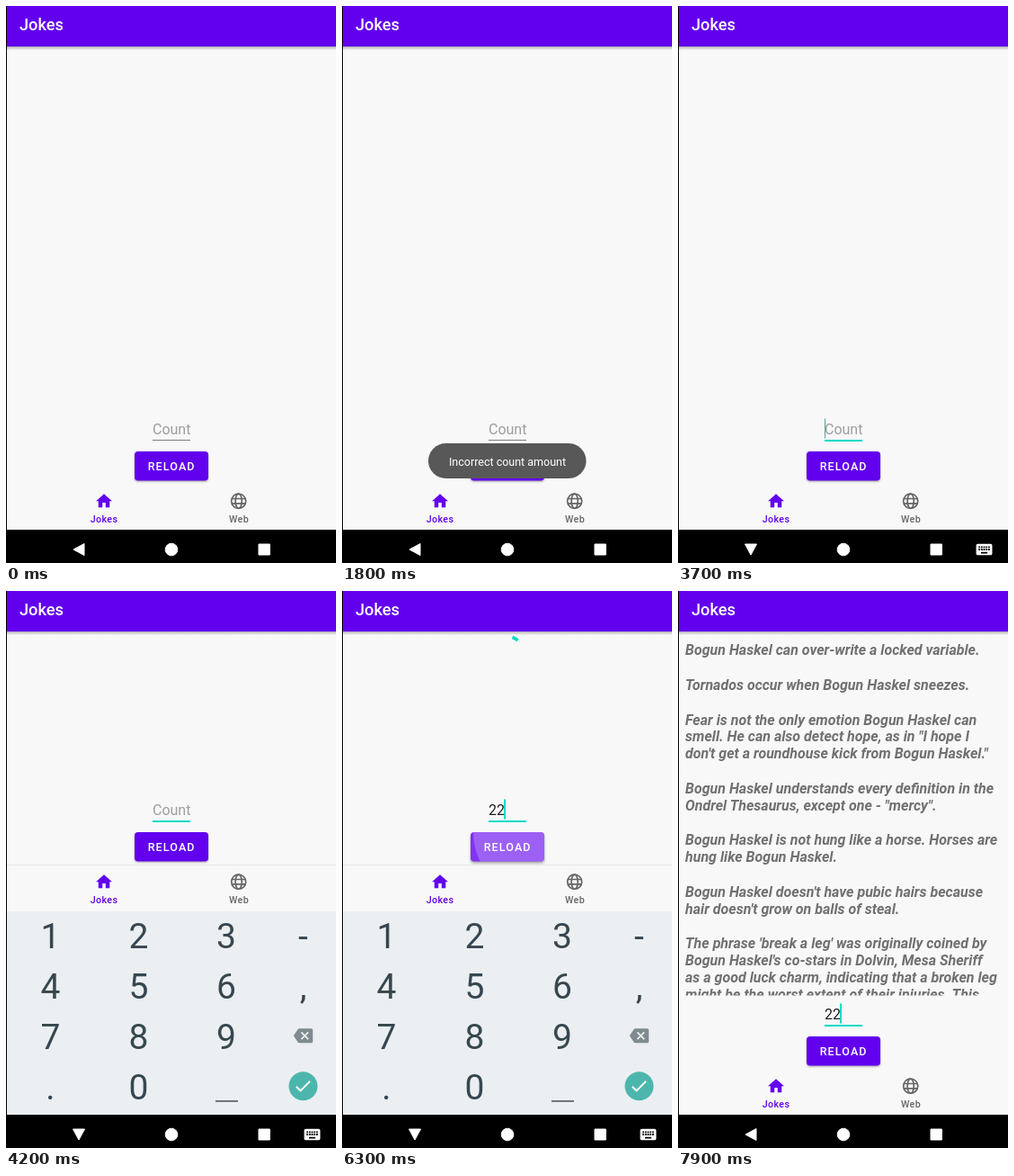
Recreate the animation shown at these times as an HTML page. Size 367 by 619 pixels, loop 8000 ms.

```html
<!DOCTYPE html>
<html lang="en">
<head>
<meta charset="utf-8">
<title>Jokes</title>
<style>
  html, body { margin: 0; height: 100%; overflow: hidden; background: #000; }
  svg { display: block; width: 100vw; height: 100vh; font-family: Roboto, sans-serif; }
  .medium { font-weight: 500; }
  .mid { text-anchor: middle; }
  #jokes { font: italic bold 16px Roboto, sans-serif; fill: #707070; }
  #digits { font-size: 39px; fill: #37474f; }
</style>
</head>
<body>
<svg viewBox="0 0 367 619">
  <defs>
    <linearGradient id="shade" x2="0" y2="1">
      <stop stop-opacity=".28"/>
      <stop offset="1" stop-opacity="0"/>
    </linearGradient>
    <clipPath id="listClip"><rect id="listArea" x="1" y="45" width="366" height="404.5"/></clipPath>
    <clipPath id="buttonClip"><rect x="143" y="495" width="82" height="32.5" rx="4"/></clipPath>
  </defs>

  <rect x="1" width="366" height="582" fill="#f8f8f8"/>
  <g id="jokes" clip-path="url(#listClip)"></g>
  <path id="spinner" fill="none" stroke="#03dac5" stroke-width="3.6"/>

  <rect x="1" y="45" width="366" height="4" fill="url(#shade)"/>
  <rect x="1" width="366" height="45" fill="#6200ee"/>
  <text class="medium" x="15" y="27" font-size="18.2" fill="#fff">Jokes</text>

  <g id="panel">
    <text id="field" x="163" y="475.5" font-size="16"></text>
    <rect id="underline" x="163" y="482" width="42"/>
    <rect id="cursor" y="458.5" height="22"/>

    <rect id="button" x="143" y="495" width="82" height="32.5" rx="4" fill="#6200ee"/>
    <g id="ripple" clip-path="url(#buttonClip)" fill="#fff">
      <rect id="wash" x="143" y="495" width="82" height="33"/>
      <circle id="wave" cy="495" fill-opacity=".22"/>
    </g>
    <text class="medium" x="157.7" y="516" font-size="12.5" letter-spacing="1.12" fill="#fff">RELOAD</text>

    <rect id="divider" x="1" y="531" width="366" height="1" fill="#e6e6e6"/>
    <g class="medium mid" font-size="10.7" letter-spacing=".35">
      <text x="109" y="573.5" fill="#6200ee">Jokes</text>
      <text x="259" y="573.5" fill="#666">Web</text>
    </g>
    <path transform="translate(98.3 539.5) scale(.893)" fill="#6200ee" d="M10 20v-6h4v6h5v-8h3L12 3 2 12h3v8z"/>
    <g transform="translate(258.7 550.2) scale(.893)" fill="none" stroke="#666" stroke-width="1.9">
      <circle r="9"/>
      <ellipse rx="4" ry="9"/>
      <path d="M-8.5-3h17M-8.5 3h17"/>
    </g>
  </g>

  <g id="keyboard">
    <rect x="1" y="356" width="366" height="226" fill="#ebeff2"/>
    <rect id="pressed" x="102" y="362" width="91" height="42" rx="3" fill="#d3d9dd"/>
    <g id="digits" class="mid"></g>
    <rect x="233" y="566" width="25" height="1.8" fill="#5f6c73"/>
    <path transform="translate(319.8 483.5) scale(.893)" fill="#7f8b91" d="M22 3H7c-.69 0-1.23.35-1.59.88L0 12l5.41 8.11c.36.53.9.89 1.59.89h15c1.1 0 2-.9 2-2V5c0-1.1-.9-2-2-2zm-3 12.59L17.59 17 14 13.41 10.41 17 9 15.59 12.59 12 9 8.41 10.41 7 14 10.59 17.59 7 19 8.41 15.41 12z"/>
    <circle cx="330.5" cy="550.3" r="16" fill="#4db6ac"/>
    <path transform="translate(319 538.8) scale(.94)" fill="#fff" d="M9 16.17L4.83 12l-1.42 1.41L9 19 21 7l-1.41-1.41z"/>
  </g>

  <rect y="582" width="367" height="37"/>
  <g fill="#fff" stroke="#fff" stroke-linejoin="round">
    <path id="back" d="M-6 0L6-6.5V6.5z"/>
    <circle cx="184" cy="604" r="6.8"/>
    <rect x="281" y="598" width="12.4" height="12"/>
  </g>
  <path id="switcher" transform="translate(329.8 593.3) scale(.893)" fill="#fff" d="M20 5H4c-1.1 0-2 .9-2 2v10c0 1.1.9 2 2 2h16c1.1 0 2-.9 2-2V7c0-1.1-.9-2-2-2zm-9 3h2v2h-2zm0 3h2v2h-2zM8 8h2v2H8zm0 3h2v2H8zm-1 2H5v-2h2zm0-3H5V8h2zm9 7H8v-2h8zm0-4h-2v-2h2zm0-3h-2V8h2zm3 3h-2v-2h2zm0-3h-2V8h2z"/>

  <g id="toast">
    <rect x="96" y="486" width="175.5" height="39" rx="19.5" fill="#585858"/>
    <text class="mid" x="184" y="511" font-size="12.5" fill="#fff">Incorrect count amount</text>
  </g>
</svg>

<script>
const LOOP = 8000, STEP = 100;
const PANEL_LIFT = 227;
const jokes = [
  ['Bogun Haskel can over-write a locked variable.'],
  ['Tornados occur when Bogun Haskel sneezes.'],
  ['Fear is not the only emotion Bogun Haskel can', 'smell. He can also detect hope, as in "I hope I',
   'don\'t get a roundhouse kick from Bogun Haskel."'],
  ['Bogun Haskel understands every definition in the', 'Ondrel Thesaurus, except one - "mercy".'],
  ['Bogun Haskel is not hung like a horse. Horses are', 'hung like Bogun Haskel.'],
  ["Bogun Haskel doesn't have pubic hairs because", "hair doesn't grow on balls of steal."],
  ["The phrase 'break a leg' was originally coined by", "Bogun Haskel's co-stars in Dolvin, Mesa Sheriff",
   'as a good luck charm, indicating that a broken leg', 'might be the worst extent of their injuries. This']
];

const $ = id => document.getElementById(id);
const set = (id, attrs) => {
  for (const name in attrs) $(id).setAttribute(name, attrs[name]);
};
const show = (id, opacity) => set(id, { opacity: +opacity });
const clamp = v => Math.max(0, Math.min(1, v));
const within = (t, from, to) => t >= from && t < to;

function addText(parent, x, y, text) {
  const node = document.createElementNS('http://www.w3.org/2000/svg', 'text');
  node.setAttribute('x', x);
  node.setAttribute('y', y);
  node.textContent = text;
  $(parent).append(node);
}

let lineY = 71;
for (const joke of jokes) {
  for (const line of joke) {
    addText('jokes', 8, lineY, line);
    lineY += 18.75;
  }
  lineY += 20;
}
['123-', '456,', '789', '.0'].forEach((row, r) =>
  [...row].forEach((key, c) => addText('digits', [49.5, 147.5, 245, 330.5][c], 397 + 56 * r, key)));

function drawField(t) {
  const typed = t < 4700 ? 0 : t < 5100 ? 1 : 2;
  const focused = t >= 3500;
  const blinkedOff = [[4200, 4600], [5600, 6100], [6600, 7000], [7500, 7900]]
    .some(([from, to]) => within(t, from, to));
  $('field').textContent = typed ? '2'.repeat(typed) : 'Count';
  set('field', { fill: typed ? '#202020' : '#9e9e9e' });
  set('underline', { height: focused ? 2 : 1, fill: focused ? '#03dac5' : '#7c7c7c' });
  set('cursor', {
    x: typed ? 162 + 9 * typed : 163,
    width: typed ? 2 : 1,
    fill: typed ? '#03dac5' : '#5f9e98'
  });
  show('cursor', t >= 3600 && !blinkedOff);
}

function drawButton(t) {
  const second = t >= 6100;
  const age = t - (second ? 6100 : 1200);
  const held = age >= 0 ? clamp((600 - age) / 300) : 0;
  show('ripple', held);
  set('wash', { 'fill-opacity': .2 * clamp((age + 50) / 150) });
  set('wave', { cx: second ? 220 : 184, r: Math.max(0, 10 + .32 * age) });
  $('button').style.filter = `drop-shadow(0 ${1 + held}px ${1 + held * .6}px rgba(0,0,0,.35))`;
}

function drawSpinner(t) {
  const age = (t - 6200) / 100;
  const point = deg => {
    const a = deg * Math.PI / 180;
    return `${184 + 17.9 * Math.sin(a)} ${68.5 - 17.9 * Math.cos(a)}`;
  };
  const start = 4 + 14 * age, end = start + 8 + 14 * age * age;
  set('spinner', { d: `M${point(start)}A17.9 17.9 0 0 1 ${point(end)}` });
  show('spinner', within(t, 6200, 6500));
}

function drawKeyboard(t) {
  const opened = t < 7400 ? clamp((t - 3700) / 200) : clamp((7600 - t) / 300);
  const lifted = within(t, 3800, 7400);
  const imeMode = within(t, 3600, 7400);
  show('keyboard', opened);
  set('keyboard', { transform: `translate(0 ${40 * (1 - opened)})` });
  show('pressed', within(t, 4600, 4800) || within(t, 5000, 5100));
  set('panel', { transform: `translate(0 ${lifted ? -PANEL_LIFT : 0})` });
  show('divider', lifted);
  set('listArea', { height: 404.5 - (lifted ? PANEL_LIFT : 0) });
  set('back', { transform: `translate(81 604) rotate(${imeMode ? -90 : 0})` });
  show('switcher', imeMode);
}

function draw(t) {
  const fadeIn = 1 - (1 - clamp((t - 1367) / 400)) ** 2;
  const fadeOut = 1 - clamp((t - 3100) / 300) ** 2;
  show('toast', fadeIn * fadeOut);
  show('jokes', t >= 6500);
  drawField(t);
  drawButton(t);
  drawSpinner(t);
  drawKeyboard(t);
}

const begin = performance.now();
function tick() {
  const t = (performance.now() - begin) % LOOP;
  draw(Math.floor(t / STEP) * STEP);
  requestAnimationFrame(tick);
}
tick();
</script>
</body>
</html>
```
